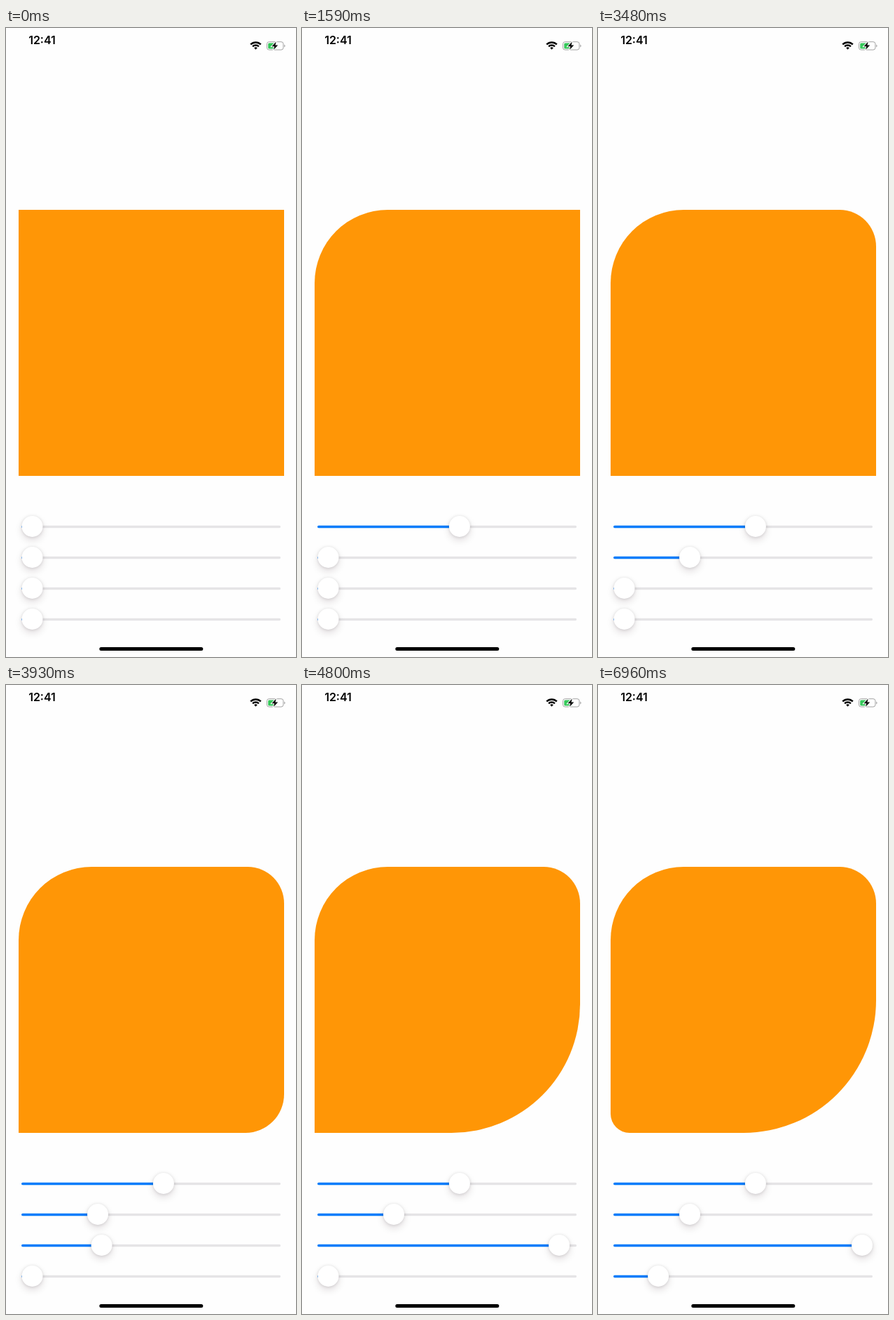
Write an HTML page that moves like this. It is 414 px wide and 896 px high and loops after 7380 ms.

```html
<!DOCTYPE html>
<html lang="en">
<head>
<meta charset="utf-8">
<title>Corner radius sliders</title>
<style>
  @property --tl { syntax: "<number>"; inherits: true; initial-value: 0; }
  @property --tr { syntax: "<number>"; inherits: true; initial-value: 0; }
  @property --br { syntax: "<number>"; inherits: true; initial-value: 0; }
  @property --bl { syntax: "<number>"; inherits: true; initial-value: 0; }

  html, body { margin: 0; width: 100%; height: 100%; overflow: hidden; background: #fefefe; }

  .stage {
    position: relative;
    width: 414px;
    height: 896px;
    overflow: hidden;
    animation: 7.38s linear infinite;
    animation-name: top-left, top-right, bottom-right, bottom-left;
  }

  .shape {
    --r: 189px;
    position: absolute;
    left: 18px;
    top: 259px;
    width: 378.5px;
    height: 378.5px;
    background: #ff9606;
    border-radius: calc(var(--tl) * var(--r)) calc(var(--tr) * var(--r))
                   calc(var(--br) * var(--r)) calc(var(--bl) * var(--r));
  }

  .slider { position: absolute; left: 22px; width: 370px; height: 32px; }
  .slider svg { position: absolute; inset: 0; width: 370px; height: 32px; }
  .slider rect { y: 14.7px; height: 3.5px; rx: 1.75px; }
  .track { width: 370px; fill: #e5e4e6; }
  .fill { width: calc(15px + var(--v) * 339.5px); fill: #047cfb; }
  .knob {
    position: absolute;
    left: 0;
    top: .5px;
    width: 30px;
    height: 30px;
    border-radius: 50%;
    background: #fff;
    box-shadow: 0 .5px 4px rgba(0, 0, 0, .13), 0 5px 11px rgba(40, 0, 20, .13);
    transform: translateX(calc(.5px + var(--v) * 339.5px));
  }

  .chrome { position: absolute; inset: 0; }
  .chrome text { font: 600 16px Inter, sans-serif; text-anchor: middle; }

  @keyframes top-left {
    0% { --tl: 0; }
    1.626% { --tl: 0; animation-timing-function: cubic-bezier(.4, 0, .7, .76); }
    11.382% { --tl: .424; animation-timing-function: cubic-bezier(.25, .5, .6, 1); }
    18.699%, 100% { --tl: .552; }
  }
  @keyframes top-right {
    0% { --tr: 0; }
    26.829% { --tr: 0; animation-timing-function: cubic-bezier(.45, .05, .6, 1); }
    39.024%, 100% { --tr: .2754; }
  }
  @keyframes bottom-right {
    0% { --br: 0; }
    47.154% { --br: 0; animation-timing-function: cubic-bezier(.35, 0, .7, .7); }
    58.13% { --br: .669; animation-timing-function: cubic-bezier(.3, .405, .7, .874); }
    65.041% { --br: .9706; animation-timing-function: cubic-bezier(.25, .5, .6, 1); }
    68.293%, 100% { --br: 1; }
  }
  @keyframes bottom-left {
    0% { --bl: 0; }
    78.862% { --bl: 0; animation-timing-function: cubic-bezier(.42, 0, .58, 1); }
    91.463%, 100% { --bl: .143; }
  }
</style>
</head>
<body>
<div class="stage">
  <div class="shape"></div>

  <div class="slider" style="top: 694px; --v: var(--tl)">
    <svg><rect class="track"/><rect class="fill"/></svg><div class="knob"></div>
  </div>
  <div class="slider" style="top: 738px; --v: var(--tr)">
    <svg><rect class="track"/><rect class="fill"/></svg><div class="knob"></div>
  </div>
  <div class="slider" style="top: 782px; --v: var(--br)">
    <svg><rect class="track"/><rect class="fill"/></svg><div class="knob"></div>
  </div>
  <div class="slider" style="top: 826px; --v: var(--bl)">
    <svg><rect class="track"/><rect class="fill"/></svg><div class="knob"></div>
  </div>

  <svg class="chrome" width="414" height="896">
    <text x="51.5" y="22.7">12:41</text>

    <!-- Wi-Fi -->
    <g fill="none" stroke="#000" stroke-width="2.5">
      <path d="M349.22 23.42a10.3 10.3 0 0 1 14.56 0"/>
      <path d="M352.12 26.32a6.2 6.2 0 0 1 8.76 0"/>
    </g>
    <path d="M356.5 30.7l-2.33-2.33a3.3 3.3 0 0 1 4.66 0z"/>

    <!-- Battery -->
    <rect x="372.5" y="19.7" width="23.4" height="11.4" rx="3" fill="none" stroke="#a3a3a3"/>
    <path d="M397.2 23.4a2.2 2.2 0 0 1 0 4z" fill="#a3a3a3"/>
    <rect x="374.2" y="21.4" width="11.6" height="8" rx="1.5" fill="#34c759"/>
    <path d="M385.6 19.6l-6.2 6.6h3.8l-1.2 4.8 6.2-6.6h-3.8z"
          stroke="#fefefe" stroke-width="2" paint-order="stroke"/>

    <rect x="133.3" y="882" width="148" height="5" rx="2.5"/>
  </svg>
</div>
</body>
</html>
```
